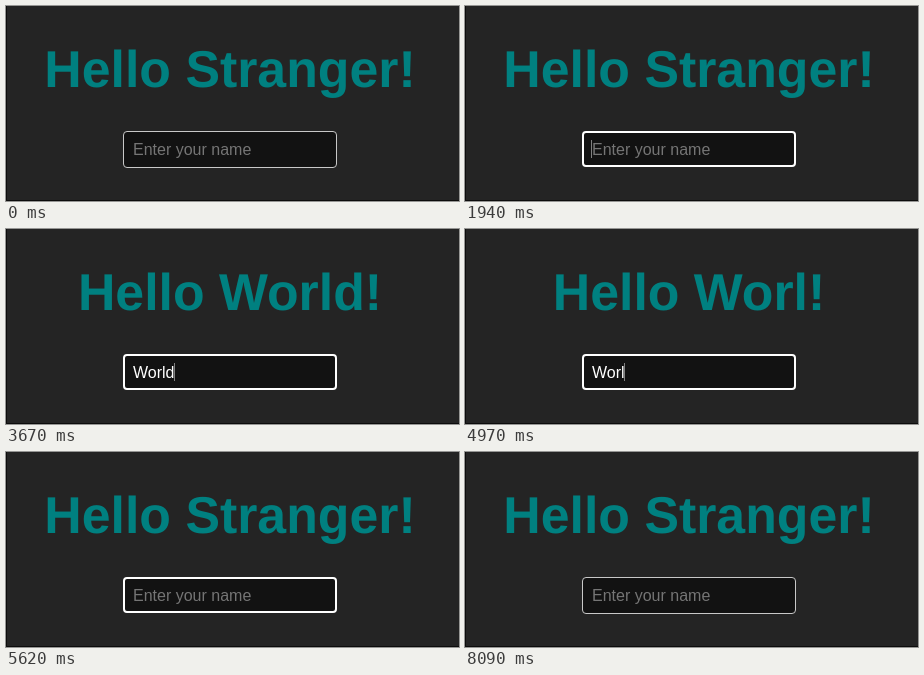
Recreate the animation shown at these times as an HTML page. Size 453x195 px, loop 8.19 s.

```html
<!DOCTYPE html>
<html lang="en">
<head>
<meta charset="utf-8">
<title>Hello</title>
<style>
html, body { margin: 0; width: 100%; height: 100%; overflow: hidden; background: #242424; }
svg { display: block; width: 100vw; height: 100vh; }
text { font-family: "Liberation Sans", Arial, sans-serif; }
#title {
  font-size: 51.8px; font-weight: bold; fill: #008080;
  text-anchor: middle; text-rendering: geometricPrecision;
}
#value { font-size: 16px; }
</style>
</head>
<body>
<svg viewBox="0 0 453 195">
  <rect width="453" height="195" fill="#242424"/>
  <path d="M.5 0V194.5H453" fill="none" stroke="#0c0c0c"/>
  <text id="title" x="224" y="80.5"></text>
  <rect id="box" fill="#121212"/>
  <text id="value" x="127" y="149"></text>
  <rect id="caret" y="134" width="1" height="18" fill="#808080"/>
</svg>
<script>
const LOOP = 8190, FOCUS = 630, BLUR = 8090;
const LEFT = 127;

// [time, field content]
const typing = [
  [0, ""], [2230, "W"], [2610, "Wo"], [2840, "Wor"], [3340, "Worl"], [3670, "World"],
  [4970, "Worl"], [5040, "Wor"], [5220, "Wo"], [5380, "W"], [5620, ""]
];
// The caret toggles at each of these times, starting hidden.
const blinks = [FOCUS, 1080, 1660, 4120, 4640, 5620, 5750, 6200, 6730, 7160, 7880, BLUR];

const idleBox = {
  x: 117.5, y: 125.5, width: 213, height: 36, rx: 3.5, stroke: "#c8c8c8", "stroke-width": 1
};
const focusBox = {
  x: 118, y: 126, width: 212, height: 34, rx: 3, stroke: "#fff", "stroke-width": 2
};

const [title, box, value, caret] =
  ["title", "box", "value", "caret"].map(id => document.getElementById(id));

function set(el, attrs) {
  for (const name in attrs) el.setAttribute(name, attrs[name]);
}

function setText(el, text) {
  if (el.textContent !== text) el.textContent = text;
}

function render(t) {
  const name = typing.filter(([at]) => at <= t).pop()[1];
  const focused = t >= FOCUS && t < BLUR;
  const caretOn = blinks.filter(at => at <= t).length % 2 === 1;

  setText(title, `Hello ${name || "Stranger"}!`);
  setText(value, name || "Enter your name");
  set(value, { fill: name ? "#fff" : "#757575" });
  set(box, focused ? focusBox : idleBox);

  const end = name ? value.getComputedTextLength() : -1;
  set(caret, {
    x: Math.floor(LEFT + end),
    visibility: caretOn ? "visible" : "hidden"
  });
}

function tick() {
  render(performance.now() % LOOP);
  requestAnimationFrame(tick);
}
tick();
</script>
</body>
</html>
```
